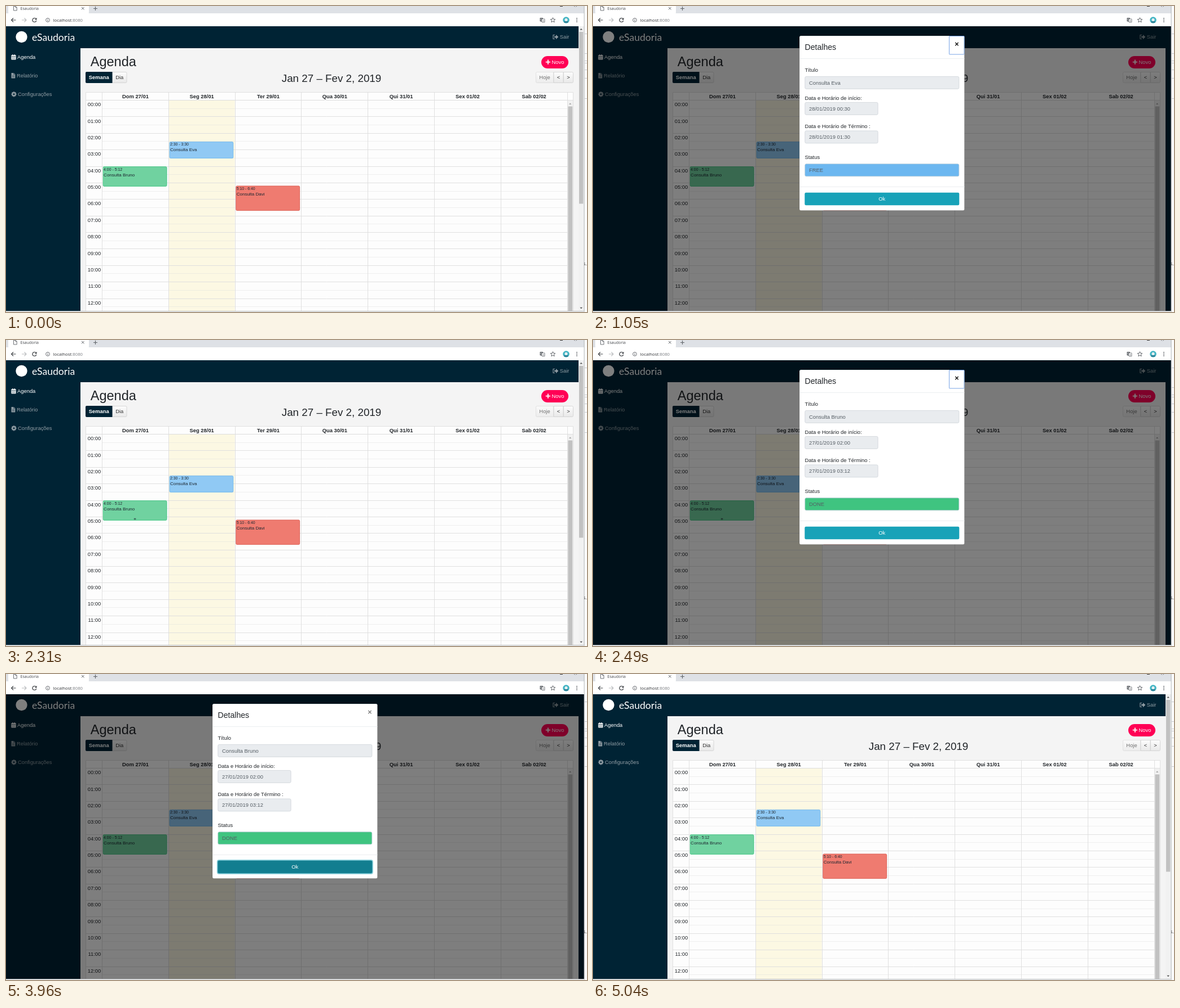
Recreate the animation shown at these times as an HTML page with a canvas. Size 1030x544 px, loop 5100 ms.

```html
<!DOCTYPE html>
<html lang="pt">
<head>
<meta charset="utf-8">
<title>Agenda</title>
<style>
html, body { margin: 0; width: 100%; height: 100%; overflow: hidden; background: #fff; }
canvas { display: block; width: 1030px; height: 544px; }
</style>
</head>
<body>
<canvas id="stage" width="1030" height="544"></canvas>
<script>
const ctx = document.getElementById('stage').getContext('2d');
const LOOP = 5100;
const SANS = '"Liberation Sans", Arial, sans-serif';
const NAVY = '#002334', INK = '#212529', LINE = '#dddddd';
const BASE = 9.4, TOP = 168, HOUR = 29.38, LEFT = 170.5, COL = 117.8;
const DAYS = ['Dom 27/01', 'Seg 28/01', 'Ter 29/01', 'Qua 30/01', 'Qui 31/01', 'Sex 01/02', 'Sab 02/02'];

const EVENTS = {
  eva: { day: 1, from: 2.5, to: 3.5, time: '2:30 - 3:30', title: 'Consulta Eva', fill: '#90c9f4', edge: '#6cb7f0',
         start: '28/01/2019 00:30', end: '28/01/2019 01:30', status: 'FREE' },
  bruno: { day: 0, from: 4, to: 5.2, time: '4:00 - 5:12', title: 'Consulta Bruno', fill: '#70d2a0', edge: '#3fc480',
           start: '27/01/2019 02:00', end: '27/01/2019 03:12', status: 'DONE' },
  davi: { day: 2, from: 5 + 1 / 6, to: 6 + 2 / 3, time: '5:10 - 6:40', title: 'Consulta Davi', fill: '#ef7b70', edge: '#dc5a4e' }
};

// Pointer hover over events: [event, from ms, to ms]
const HOVERS = [['eva', 390, 420], ['eva', 600, 1050], ['davi', 2160, 2280], ['bruno', 2310, 2520], ['davi', 3990, 4200]];
// Dialog times in ms
const DIALOGS = [
  { event: 'eva', open: 960, hover: 1860, press: 2070, ring: 2130, close: 2160 },
  { event: 'bruno', open: 2490, hover: 2970, press: 3930, ring: 3960, close: 3990 }
];

const within = (t, a, b) => t >= a && t < b;

function rect(x, y, w, h, color) {
  ctx.fillStyle = color;
  ctx.fillRect(x, y, w, h);
}

function box(x, y, w, h, r, fill, edge, lw = 1) {
  ctx.beginPath();
  ctx.roundRect(x, y, w, h, r);
  if (fill) { ctx.fillStyle = fill; ctx.fill(); }
  if (edge) { ctx.strokeStyle = edge; ctx.lineWidth = lw; ctx.stroke(); }
}

function text(s, x, y, size, color = INK, align = 'left', weight = 400, family = SANS) {
  ctx.font = `${weight} ${size}px ${family}`;
  ctx.textAlign = align;
  ctx.fillStyle = color;
  ctx.fillText(s, x, y);
}

// Each argument after the width is one polyline: [x, y, x, y, ...]
function lines(color, lw, ...paths) {
  ctx.strokeStyle = color;
  ctx.lineWidth = lw;
  ctx.beginPath();
  for (const p of paths) {
    ctx.moveTo(p[0], p[1]);
    for (let i = 2; i < p.length; i += 2) ctx.lineTo(p[i], p[i + 1]);
  }
  ctx.stroke();
}

function poly(color, ...p) {
  ctx.fillStyle = color;
  ctx.beginPath();
  for (let i = 0; i < p.length; i += 2) ctx.lineTo(p[i], p[i + 1]);
  ctx.fill();
}

function disc(x, y, r, color) {
  ctx.fillStyle = color;
  ctx.beginPath();
  ctx.arc(x, y, r, 0, 7);
  ctx.fill();
}

function ring(x, y, r, color, lw, a = 0, b = Math.PI * 2) {
  ctx.strokeStyle = color;
  ctx.lineWidth = lw;
  ctx.beginPath();
  ctx.arc(x, y, r, a, b);
  ctx.stroke();
}

function star(x, y, r) {
  ctx.strokeStyle = '#5f6368';
  ctx.lineWidth = 1;
  ctx.beginPath();
  for (let i = 0; i < 10; i++) {
    const a = i * Math.PI / 5 - Math.PI / 2, d = i % 2 ? r * 0.45 : r;
    ctx.lineTo(x + d * Math.cos(a), y + d * Math.sin(a));
  }
  ctx.closePath();
  ctx.stroke();
}

function browser() {
  const gray = '#5f6368';
  rect(0, 0, 1030, 544, '#ffffff');
  rect(0, 0, 1025, 13, '#dee1e6');
  box(4, -8, 143, 24, 5, '#ffffff');
  rect(0, 13, 1025, 23, '#ffffff');
  lines(gray, 0.9, [13.5, 0.5, 17, 0.5, 19.2, 2.7, 19.2, 8, 13.5, 8, 13.5, 0.5], [17, 0.5, 17, 2.7, 19.2, 2.7]);
  text('Esaudoria', 25.5, 7, 7, '#45484c', 'left', 400, '"Open Sans", sans-serif');
  lines(gray, 1, [134, 2, 138.5, 6.5], [138.5, 2, 134, 6.5]);
  lines(gray, 1.1, [155, 4.5, 162, 4.5], [158.5, 1, 158.5, 8]);
  lines('#333333', 1, [982, 0.5, 987, 0.5]);
  lines('#555555', 0.8, [1007, 0, 1008.5, 1.2], [1012, 0, 1010.5, 1.2]);
  lines('#45484c', 1.2, [17.5, 25, 9.5, 25], [13, 21.5, 9.5, 25, 13, 28.5]);
  lines('#b9bbbe', 1.1, [28, 25, 36, 25], [32.5, 21.5, 36, 25, 32.5, 28.5]);
  ring(50.5, 25, 3.5, '#45484c', 1.2, 0.3, 5.5);
  poly('#45484c', 54.6, 20.7, 54.6, 24.4, 50.9, 24.4);
  ring(74, 25, 3.4, gray, 0.9);
  lines(gray, 1, [74, 24.6, 74, 27], [74, 22.8, 74, 23.7]);
  text('localhost', 83.5, 27.7, 7.8, '#303236', 'left', 400, '"Open Sans", sans-serif');
  text(':8080', 83.5 + ctx.measureText('localhost').width, 27.7, 7.8, '#7b7e82', 'left', 400, '"Open Sans", sans-serif');
  box(946.5, 21, 5.5, 6.5, 0.8, gray);
  box(950, 23, 5, 6, 0.5, '#ffffff', gray, 0.8);
  text('G', 947.2, 26.3, 4.5, '#ffffff');
  text('x', 951.4, 28, 5, gray);
  star(969.5, 25.2, 4.5);
  disc(993, 25, 5.8, '#43b5c4');
  box(990.5, 22, 5, 5, 2, '#e9eef0');
  rect(989.5, 27.5, 7, 2, '#276d86');
  for (let i = -1; i < 2; i++) disc(1012, 25 + i * 3, 0.9, gray);
}

function backWindow() {
  rect(1025, 0, 5, 544, '#fbfbfb');
  rect(1024.6, 0, 0.9, 544, '#a9adb0');
  for (const y of [49, 84, 97, 101, 113, 128, 164]) rect(1026, y, 4, 1, '#c9cbd0');
  rect(0, 542, 1025, 2, '#eef0f1');
  rect(0, 542, 1025, 0.7, '#a9adb0');
  ctx.save();
  ctx.beginPath();
  ctx.rect(0, 542.5, 1030, 2);
  ctx.rect(1025, 440, 5, 30);
  ctx.clip();
  text('Abc  Ed  Tabl', 10, 548.5, 8, '#333333');
  text('Caderno de notas - Resumo semanal das tarefas pendentes e', 132, 548.5, 8, '#25305a', 'left', 700);
  text('sáb, 26/01/2019   102 KB', 411, 548.5, 8, '#333333');
  text('s.', 1022.5, 461, 9, '#333333');
  ctx.restore();
}

function sidebar() {
  const dim = '#919da4';
  rect(0, 36, 1015, 39, NAVY);
  rect(0, 74, 132, 468, NAVY);
  disc(27.5, 55, 10.2, '#ffffff');
  text('eSaudoria', 46, 61.6, 17.6, '#ffffff', 'left', 400, 'Lato, sans-serif');

  lines(dim, 1.1, [973, 51.5, 970, 51.5, 970, 58.5, 973, 58.5]);
  rect(972, 53.8, 3.5, 2.5, dim);
  poly(dim, 975, 51, 979.3, 55, 975, 59.2);
  text('Sair', 981.8, 58.3, BASE, dim);

  box(9.3, 87.3, 8.4, 8.3, 1, '#ffffff');
  rect(11.2, 86.1, 1.2, 2, '#ffffff');
  rect(14.6, 86.1, 1.2, 2, '#ffffff');
  rect(9.3, 89, 8.4, 0.6, NAVY);
  for (let i = 0; i < 6; i++) rect(10.6 + i % 3 * 2.3, 90.7 + (i > 2) * 2.3, 1.1, 1.2, NAVY);
  text('Agenda', 20, 94.3, BASE, '#ffffff');

  poly(dim, 9.5, 119, 13.8, 119, 16.3, 121.5, 16.3, 128.5, 9.5, 128.5);
  lines(NAVY, 0.6, [13.6, 119, 13.6, 121.7, 16.3, 121.7], [11, 124, 14.8, 124], [11, 126, 14.8, 126]);
  text('Relatório', 19, 127.3, BASE, dim);

  for (let i = 0; i < 8; i++) {
    const a = i * Math.PI / 4, c = Math.cos(a), s = Math.sin(a);
    lines(dim, 2, [14 + c * 2, 156.8 + s * 2, 14 + c * 4.6, 156.8 + s * 4.6]);
  }
  disc(14, 156.8, 3.6, dim);
  disc(14, 156.8, 1.5, NAVY);
  text('Configurações', 21, 160.3, BASE, dim);
}

function button(x, w, r, label, color) {
  const g = ctx.createLinearGradient(0, 117, 0, 137);
  g.addColorStop(0, '#fdfdfd');
  g.addColorStop(1, '#e8e8e8');
  box(x + 0.5, 117.5, w - 1, 19, r, g, '#d0d0d0', 0.8);
  text(label, x + w / 2, 130.4, BASE, color, 'center');
}

function toolbar() {
  rect(132, 75, 883, 467, '#f4f4f4');
  text('Agenda', 149.8, 106.6, 23.5);
  box(949, 89, 48, 22, 11, '#ff0055');
  lines('#ffffff', 1.8, [956.8, 99.7, 965, 99.7], [960.9, 95.6, 960.9, 103.8]);
  text('Novo', 967.6, 103.2, BASE, '#ffffff');
  button(188, 26.5, [0, 2, 2, 0], 'Dia', '#333333');
  box(141, 117, 47.5, 20, [2, 0, 0, 2], NAVY);
  text('Semana', 164.7, 130.4, BASE, '#ffffff', 'center', 700);
  text('Jan 27 – Fev 2, 2019', 577, 134.8, 18.8, INK, 'center');
  ctx.globalAlpha = 0.68;
  button(939, 32, [2, 0, 0, 2], 'Hoje', '#333333');
  ctx.globalAlpha = 1;
  button(970.5, 18, 0, '<', '#333333');
  button(988, 18, [0, 2, 2, 0], '>', '#333333');
}

function grid() {
  rect(141, 153, 865, 389, '#fdfdfd');
  rect(288.5, TOP, COL - 0.7, 374, '#fcf8e3');
  for (let h = 0; h < 13; h++) {
    const y = Math.round(TOP + h * HOUR) - 0.5, half = Math.round(TOP + (h + 0.5) * HOUR) - 0.5;
    lines(LINE, 0.9, [141, y, 996, y]);
    if (half < 542) {
      ctx.setLineDash([1, 1]);
      lines('#d9d9d9', 0.8, [LEFT, half, 996, half]);
      ctx.setLineDash([]);
    }
    text(String(h).padStart(2, '0') + ':00', 168.3, TOP + h * HOUR + 10.2, BASE, INK, 'right');
  }
  DAYS.forEach((d, i) => {
    const x = Math.floor(LEFT + i * COL) + 0.5;
    lines(LINE, 0.9, [x, 153, x, 542]);
    text(d, LEFT + (i + 0.5) * COL, 163.6, BASE, INK, 'center', 700);
  });
  lines(LINE, 0.9, [141.5, 542, 141.5, 153.5, 1005.5, 153.5, 1005.5, 542], [995.5, 153, 995.5, 542], [141, 167.5, 1006, 167.5]);
  rect(996, 168, 9, 374, '#f1f1f1');
  poly('#a3a3a3', 998, 175, 1000.2, 172.5, 1002.4, 175);
  rect(996.5, 178.5, 7.7, 363.5, '#c1c1c1');
}

function eventBox(e, hovered) {
  const x = LEFT + e.day * COL + 1.3, y = TOP + e.from * HOUR, h = (e.to - e.from) * HOUR;
  box(x + 0.4, y + 0.2, 112.8, h - 0.5, 1.8, e.fill, e.edge, 0.9);
  text(e.time, x + 1.3, y + 7, 6.9, '#1d2730');
  text(e.title, x + 1.3, y + 17, 8, '#1d2730');
  if (hovered) lines('#26343a', 0.8, [x + 55, y + h - 3.4, x + 58.5, y + h - 3.4], [x + 55, y + h - 1.9, x + 58.5, y + h - 1.9]);
}

function pageScroll(active) {
  rect(1015, 36, 10, 506, '#f1f1f1');
  poly('#505050', 1017.4, 42.5, 1019.7, 39.9, 1022, 42.5);
  poly('#505050', 1017.4, 535.7, 1019.7, 538.3, 1022, 535.7);
  rect(1016, 46, 7.3, 305.5, active ? '#a8a8a8' : '#c1c1c1');
}

function field(y, w, value, fill = '#e9ecef', edge = '#ced4da') {
  box(375.8, y + 0.4, w, 22, 2.3, fill, edge, 0.8);
  text(value, 383, y + 14.5, BASE, '#555d64');
}

function dialog(d, t) {
  const e = EVENTS[d.event], focused = t < d.press;
  rect(1015, 36, 10, 506, NAVY);
  rect(0, 36, 1025, 506, 'rgba(0,0,0,.5)');
  box(366, 53, 292.5, 310.5, 2.5, '#ffffff', 'rgba(0,0,0,.2)', 0.6);
  text('Detalhes', 375.5, 77.6, 14.1);
  if (focused) box(631.5, 53.5, 26.5, 32.5, 0.5, '#ffffff', '#79a5e6', 1);
  ctx.textBaseline = 'middle';
  text('×', 645, 69, 12.6, focused ? '#111111' : '#808080', 'center', 700);
  ctx.textBaseline = 'alphabetic';
  lines('#e9ecef', 0.9, [366, 93.5, 658.5, 93.5], [366, 321.5, 658.5, 321.5]);
  text('Título', 375.5, 117.2, BASE);
  field(125, 273, e.title);
  text('Data e Horário de início:', 375.5, 166.9, BASE);
  field(171, 129.3, e.start);
  text('Data e Horário de Término :', 375.5, 217.4, BASE);
  field(221.5, 129.3, e.end);
  text('Status', 375.5, 272.2, BASE);
  field(280.4, 273, e.status, e.edge, '#b5cad6');

  if (t >= d.ring) box(374.7, 331, 275.3, 24, 3, null, 'rgba(23,162,184,.5)', 1.8);
  const tone = t < d.hover ? '#18a2b8' : t < d.hover + 30 ? '#1694a8' : t < d.press ? '#138496' : '#127e90';
  box(375.3, 331.8, 274, 22.4, 2.3, tone);
  text('Ok', 512.3, 346, BASE, '#ffffff', 'center');
}

function draw(t) {
  browser();
  sidebar();
  toolbar();
  grid();
  for (const name in EVENTS) {
    eventBox(EVENTS[name], HOVERS.some(h => h[0] === name && within(t, h[1], h[2])));
  }
  pageScroll(within(t, 4440, 4470));
  const open = DIALOGS.find(d => within(t, d.open, d.close));
  if (open) dialog(open, t);
  backWindow();
}

const begin = performance.now();
function tick() {
  draw((performance.now() - begin) % LOOP);
  requestAnimationFrame(tick);
}
tick();
</script>
</body>
</html>
```
